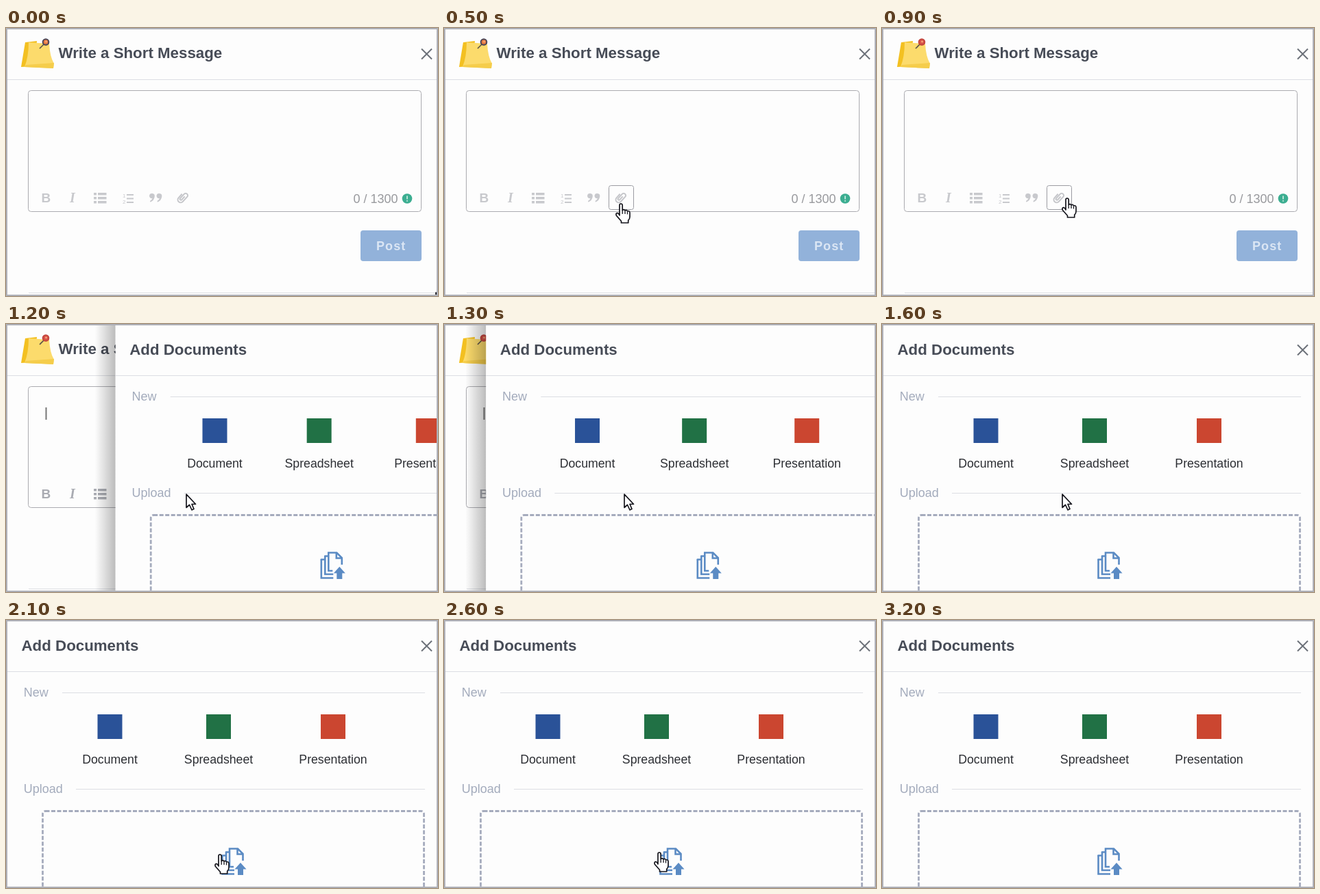
Animation, 630 px wide and 392 px high, one loop 3800 ms. Source, as an HTML page:

```html
<!DOCTYPE html>
<html lang="en">
<head>
<meta charset="utf-8">
<title>Attach a document</title>
<style>
html, body { margin: 0; width: 100%; height: 100%; overflow: hidden; background: #fdfdfd; }
svg { display: block; width: 630px; height: 392px; font-family: "Liberation Sans", Arial, sans-serif; }
.title { font-size: 22.3px; font-weight: bold; fill: #474c57; }
.label { font-size: 17.7px; fill: #2c2e33; text-anchor: middle; }
.section { font-size: 18px; fill: #a3abbc; }
.rule { stroke: #dcdee3; }
.close { stroke: #6b7078; stroke-width: 2; }
.line { fill: none; stroke: #5b8bc4; stroke-width: 2.6; }
</style>
</head>
<body>
<svg viewBox="0 0 630 392">
  <defs>
    <linearGradient id="shade">
      <stop offset="0" stop-color="#000" stop-opacity="0"/>
      <stop offset="1" stop-color="#000" stop-opacity=".26"/>
    </linearGradient>
    <clipPath id="stage"><path d="M2 2H628V390H2Z"/></clipPath>
    <path id="cross" class="close" d="M606 30.5l15 15m0 -15l-15 15"/>
    <path id="quote" d="M0 3.5a3.8 3.8 0 1 1 7.8 1q-.8 6 -6.3 8.2l-.5 -1.6q3 -1.6 3.5 -4q-4.2 .4 -4.5 -3.6z"/>
  </defs>
  <rect width="630" height="392" fill="#fdfdfd"/>

  <g clip-path="url(#stage)">
    <!-- Message form -->
    <path fill="#f3c021" d="M28 21L45 19L42 56L22 57Z"/>
    <path fill="#fcdb6c" d="M33 21L63 23Q64 42 70 52L69 59L27 57Q33 42 33 21Z"/>
    <path fill="#f5cd4b" d="M29 54L70 51L69 59L27 57Z"/>
    <path stroke="#5a5148" stroke-width="1.6" d="M49 30L56 23"/>
    <circle id="pin" cx="58" cy="20.5" r="4.3" stroke-width="2"/>
    <circle cx="58.5" cy="20" r="1.4" fill="#f6a878"/>
    <text class="title" x="76.5" y="44">Write a Short Message</text>
    <use href="#cross"/>
    <path class="rule" d="M2 75.5H628M33 387.5H628"/>
    <rect x="32.5" y="91.5" width="573" height="177" rx="4" fill="none" stroke="#ababb0"/>
    <path id="caret" stroke="#777" stroke-width="2" d="M58.5 122V140"/>
    <g id="tools">
      <text x="51.5" y="255" font-size="19" font-weight="bold">B</text>
      <text x="93" y="255" font-size="20" font-weight="bold" font-style="italic" font-family="Liberation Serif, serif">I</text>
      <path d="M128 241h4v3.5h-4zm6 0h12.500v3.500h-12.500zM128 247h4v3.500h-4zm6 0h12.500v3.500h-12.500zM128 253h4v3.500h-4zm6 0h12.500v3.500h-12.500z"/>
      <path d="M176 243h10v2h-10zm0 5.500h10v2h-10zm0 5.500h10v2h-10z"/>
      <text x="170" y="247.500" font-size="8">1</text>
      <text x="170" y="257" font-size="8">2</text>
      <use href="#quote" x="209" y="242"/>
      <use href="#quote" x="219.500" y="242"/>
      <path transform="translate(258 248) rotate(42)" fill="none" stroke="#c5c6ca" stroke-width="2"
        d="M-4.500 -3V4.500a4.200 4.200 0 0 0 8.400 0V-5a3 3 0 0 0 -6 0V3.500a1.500 1.500 0 0 0 3 0V-3"/>
    </g>
    <rect id="hover" x="240.500" y="230.500" width="36" height="35" rx="3" fill="none" stroke="#9b9ca2"/>
    <text x="506.500" y="256" font-size="18" fill="#98999d">0 / 1300</text>
    <circle cx="585" cy="249.500" r="7.300" fill="#3cae91"/>
    <path stroke="#d8f0e8" stroke-width="1.600" d="M585 245.500v5m0 1.500v1.700"/>
    <rect x="517" y="296" width="89" height="45" rx="4" fill="#92b2da"/>
    <text x="540" y="325" font-size="18" font-weight="bold" letter-spacing="1.100" fill="#dbe6f4">Post</text>

    <!-- Sliding panel -->
    <g id="panel">
      <rect x="-28" width="30" height="392" fill="url(#shade)"/>
      <rect x="2" width="640" height="392" fill="#fdfdfd"/>
      <path class="rule" d="M2 75.500H642M82 106.500H611M102 247.500H611"/>
      <text class="title" x="22.500" y="45">Add Documents</text>
      <use href="#cross"/>
      <text class="section" x="25.700" y="112">New</text>
      <text class="section" x="25.700" y="253">Upload</text>
      <rect x="53.500" y="279.500" width="556" height="150" rx="4" fill="none" stroke="#a5abbd" stroke-width="2.800" stroke-dasharray="6 2.500"/>
      <g class="item">
        <rect x="133.500" y="138" width="36" height="36" fill="#2a5298"/>
        <text class="label" x="151.500" y="210">Document</text>
      </g>
      <g class="item">
        <rect x="292" y="138" width="36" height="36" fill="#217145"/>
        <text class="label" x="310" y="210">Spreadsheet</text>
      </g>
      <g class="item">
        <rect x="459" y="138" width="36" height="36" fill="#cb4630"/>
        <text class="label" x="477" y="210">Presentation</text>
      </g>
      <g class="item">
        <path class="line" d="M332 361H326V334.500H338L345.500 342V352M337.500 335V342.500H345M321 339V366H333M315.500 344V371.500H333"/>
        <path class="line" d="M320 339.500H326M314.500 344.500H321"/>
        <path fill="#5b8bc4" d="M342 355L350.500 364.500H346V373H338V364.500H333.500Z"/>
      </g>
    </g>

    <!-- Pointers -->
    <g id="pointer" fill="#fff" stroke="#15151c" stroke-width="1.700" stroke-linejoin="round">
      <path id="arrow" d="M1 1V20.500L5.500 16.500L9 24L12 22.500L9 15.500H14.500Z"/>
      <g id="hand">
        <path d="M6 18V3.500Q6 1 8 1T10.200 3.500V10.500Q12.500 8.600 14 11Q16.500 9.500 17.500 12Q21 11 21 14.500V20Q21 23.500 18.700 25.500V29H8.500V26.500L1.500 18.500Q0 15.500 2.500 14.500Q4.500 14.500 6 18Z"/>
        <path fill="none" stroke-width="1.300" d="M10.200 10.500V16M14 11.500V16M17.500 12.500V16.500"/>
      </g>
    </g>
  </g>
  <path fill="none" stroke="#aeb0b8" stroke-width="2" d="M1 1H629V391H1Z"/>
</svg>
<script>
const LOOP = 3800, STEP = 100;
const $ = id => document.getElementById(id);
const items = [...document.querySelectorAll(".item")];
const lag = [-.03, -.07, -.12, -.085]; // columns tighten while the panel is off centre

// Pointer path: time, x, y
const path = [
  [0, 626, 386], [500, 250, 256], [600, 250, 256], [900, 262, 248],
  [1800, 262, 248], [2100, 304, 342], [2500, 304, 342], [2600, 306, 339],
  [2800, 318, 351], [3000, 322, 339], [3800, 322, 339]
];

function pointerAt(t) {
  const i = path.findIndex(p => p[0] > t);
  const [a, b] = [path[i - 1], path[i]];
  const k = (t - a[0]) / (b[0] - a[0]);
  return [a[1] + (b[1] - a[1]) * k, a[2] + (b[2] - a[2]) * k];
}

const show = (id, on) => $(id).style.display = on ? "" : "none";
const move = (el, x, y = 0) => el.setAttribute("transform", `translate(${x} ${y})`);

function draw(now) {
  const t = Math.floor(now % LOOP / STEP) * STEP;
  const open = t >= 1100;
  const slide = 626 * Math.max(0, 1 - (t - 1000) / 600) ** 3.4;

  show("panel", open);
  move($("panel"), slide);
  items.forEach((el, i) => move(el, slide * lag[i]));

  show("caret", open);
  show("hover", t >= 500 && !open);
  $("tools").setAttribute("fill", open ? "#a9abb2" : "#c8c9cd");
  $("pin").setAttribute("fill", t < 700 ? "#e8793f" : "#d9534a");
  $("pin").setAttribute("stroke", t < 700 ? "#4a4658" : "#c4473f");

  const hand = t >= 500 && !open || t >= 2100;
  show("hand", hand);
  show("arrow", !hand);
  show("pointer", t < 3200);
  move($("pointer"), ...pointerAt(t));
  requestAnimationFrame(draw);
}
requestAnimationFrame(draw);
</script>
</body>
</html>
```
